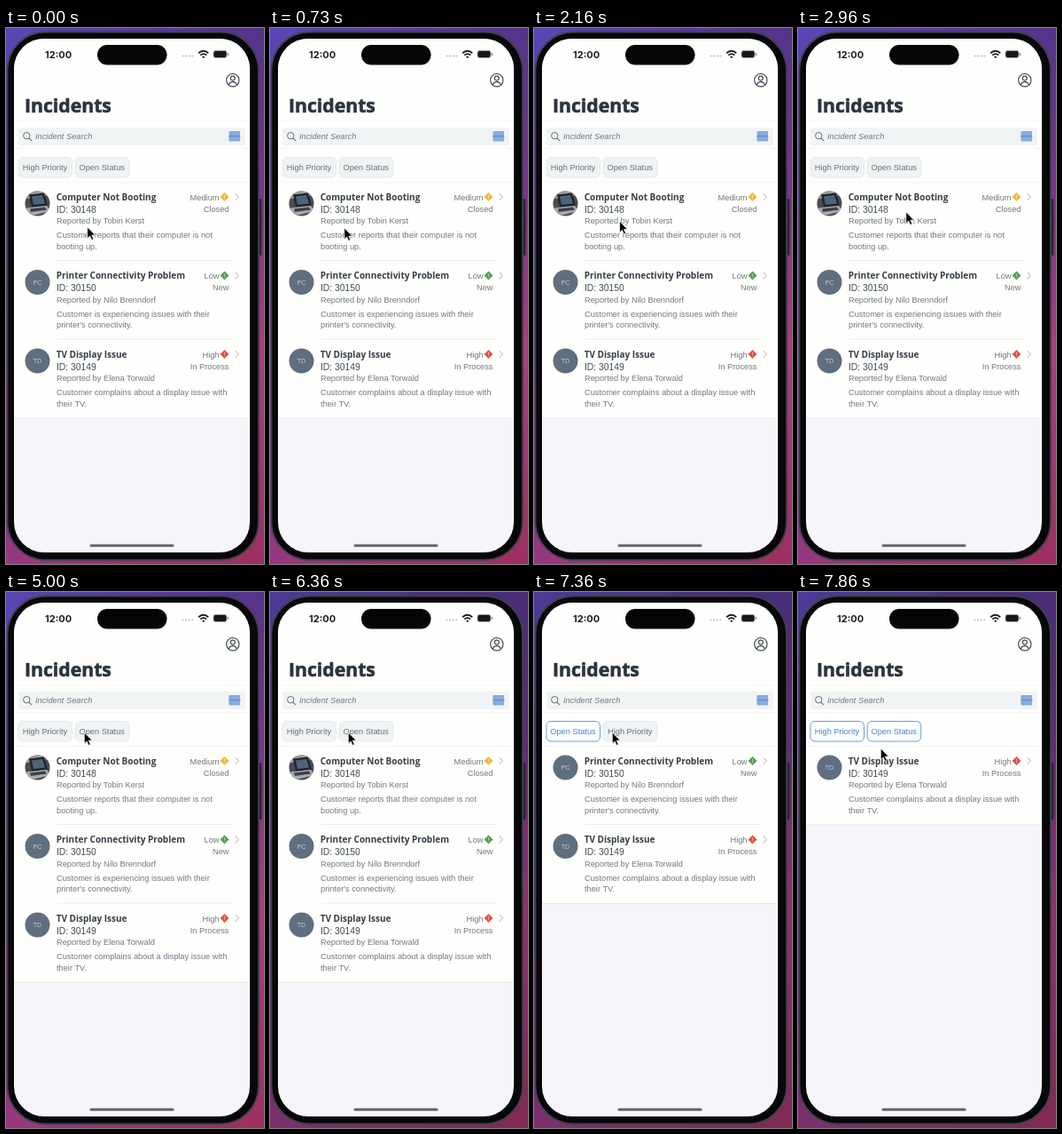
Write an HTML page that moves like this. It is 291 by 603 pixels and loops after 8000 ms.

```html
<!DOCTYPE html>
<html lang="en">
<head>
<meta charset="utf-8">
<title>Incidents</title>
<style>
html, body { margin: 0; width: 100%; height: 100%; overflow: hidden; background: #0a0a0d; }
svg { display: block; width: 100vw; height: 100vh; }
text { font: 9.25px "Liberation Sans", Arial, sans-serif; fill: #6f7881; }
.title { font: 700 21.2px "Open Sans", "Noto Sans", sans-serif; fill: #2c353e; stroke: #2c353e; stroke-width: .6; }
.name { font: 700 10px "Open Sans", "Noto Sans", sans-serif; fill: #353e47; }
.id { font-size: 10.3px; fill: #434c55; }
.clock { font: 700 11px Inter, sans-serif; fill: #1d1f21; }
.search { font-style: italic; }
.end { text-anchor: end; }
.initials { font-size: 7.2px; fill: #c3cbd3; text-anchor: middle; }
.chip rect { fill: #f0f3f4; stroke: #e6eaeb; }
.chip text { fill: #66717b; text-anchor: middle; }
.chip.on rect { fill: #fdfeff; stroke: #6f9bd3; }
.chip.on text { fill: #4c83c8; }
</style>
</head>
<body>
<svg viewBox="0 0 291 603" preserveAspectRatio="none">
  <defs>
    <linearGradient id="left" x2="0" y2="1">
      <stop stop-color="#5a46b4"/><stop offset=".5" stop-color="#55408f"/>
      <stop offset=".85" stop-color="#7d3582"/><stop offset="1" stop-color="#983a80"/>
    </linearGradient>
    <linearGradient id="right" x2="0" y2="1">
      <stop stop-color="#54338a"/><stop offset=".3" stop-color="#78368c"/>
      <stop offset=".6" stop-color="#b03c7e"/><stop offset="1" stop-color="#9c305f"/>
    </linearGradient>
    <linearGradient id="fade">
      <stop stop-color="#000"/><stop offset="1" stop-color="#fff"/>
    </linearGradient>
    <mask id="blend"><rect width="291" height="603" fill="url(#fade)"/></mask>
    <clipPath id="screen"><rect x="9" y="12" width="266" height="578" rx="34"/></clipPath>
    <clipPath id="round"><circle cx="35.5" cy="24" r="14"/></clipPath>
  </defs>

  <rect width="291" height="603" fill="url(#left)"/>
  <rect width="291" height="603" fill="url(#right)" mask="url(#blend)"/>
  <rect id="dim" width="291" height="603" fill="#1c1430" opacity="0"/>
  <rect x="284" y="192" width="4.5" height="64" rx="1.5" fill="#2b2535"/>
  <rect x="1.5" y="4.5" width="283.5" height="594" rx="43" fill="#08080b" stroke="#45414f" stroke-width="1.8"/>

  <g clip-path="url(#screen)">
    <rect x="9" y="12" width="267" height="579" fill="#f5f5fa"/>
    <rect id="panel" x="9" y="12" width="267" fill="#fefefc"/>
    <path id="edge" stroke="#e8e9ec"/>
    <path d="M9 104.5H276M9 135.5H276M9 173.5H276" stroke="#f5f6f6"/>
    <g id="rows"></g>
  </g>

  <text class="clock" x="44" y="34">12:00</text>
  <rect x="103" y="19" width="78.5" height="22.5" rx="11.2" fill="#050506"/>
  <g fill="#b9bcc0">
    <circle cx="199.5" cy="31.5" r="1"/><circle cx="203" cy="31.5" r="1"/>
    <circle cx="206.6" cy="31.5" r="1"/><circle cx="210.2" cy="31.5" r="1"/>
  </g>
  <g fill="none" stroke="#17181a" stroke-width="1.8">
    <path d="M217.2 28.2Q222.700 23.4 228.2 28.2M219.2 30.6Q222.700 27.6 226.2 30.6"/>
    <path d="M222.7 34.2l-1.6-1.9q1.6-1.2 3.2 0z" fill="#17181a" stroke="none"/>
  </g>
  <rect x="234" y="25.5" width="15" height="8" rx="2.4" fill="#17181a" stroke="#a9abad" stroke-width=".8"/>
  <path d="M250.5 28v3" stroke="#88898c" stroke-width="1.2"/>

  <g fill="none" stroke="#3a434c" stroke-width="1.1">
    <circle cx="255.8" cy="58.7" r="7.2"/>
    <circle cx="255.8" cy="56.6" r="2.5"/>
    <path d="M251.3 64Q252 60.6 255.8 60.6T260.3 64"/>
  </g>
  <text class="title" x="21" y="95">Incidents</text>

  <rect x="14" y="112" width="256" height="20" rx="3" fill="#f0f4f4"/>
  <path d="M26.2 124.2l3 3" stroke="#626c77" stroke-width="1.1"/>
  <circle cx="23.3" cy="121.2" r="3.7" fill="none" stroke="#626c77"/>
  <text class="search" x="33" y="125.2">Incident Search</text>
  <rect x="251.5" y="116" width="12.5" height="11.5" rx="1" fill="#85abe0"/>
  <path d="M251 121.8h13.5" stroke="#5b89d0"/>

  <g id="chips"></g>
  <rect x="94.5" y="580.7" width="95" height="3" rx="1.5" fill="#66676b"/>
  <path id="cursor" d="M0 0V12.6L2.9 10L4.9 14.4L7 13.5L5 9.1H9Z" fill="#060606" stroke="#fff" stroke-width=".7"/>
</svg>

<script>
const $ = id => document.getElementById(id);
const LOOP = 8000, OPEN_AT = 6500, HIGH_AT = 7530, PITCH = 88.5;

const photo = `<g clip-path="url(#round)">
  <rect x="21" y="9" width="29" height="30" fill="#4d4a50"/>
  <path d="M21 9h29v5l-29 5z" fill="#a59c99"/>
  <path d="M26 14l17-2 4 14-18 2z" fill="#1f2630"/>
  <path d="M29 16l12-1.500 3 9.500-13 1.500z" fill="#4d6479"/>
  <path d="M23 29l23-2.500 4 6-25 6z" fill="#a9abb2"/>
  <path d="M27 30l17-2 2 3-18 2.500z" fill="#3c3f47"/></g>`;

const items = [
  ["", "Computer Not Booting", 30148, "Tobin Kerst", "Medium", "#f0b83c", "Closed",
    "Customer reports that their computer is not", "booting up."],
  ["PC", "Printer Connectivity Problem", 30150, "Nilo Brenndorf", "Low", "#5a9f57", "New",
    "Customer is experiencing issues with their", "printer's connectivity."],
  ["TD", "TV Display Issue", 30149, "Elena Torwald", "High", "#dd5546", "In Process",
    "Customer complains about a display issue with", "their TV."],
];

function row([initials, name, id, by, priority, color, status, line1, line2], i, list) {
  const avatar = initials
    ? `<circle cx="35.5" cy="24" r="14" fill="#5f6f7f"/><text class="initials" x="35.5" y="26.6">${initials}</text>`
    : photo;
  const rule = i < list.length - 1 ? `<path d="M57 88H256" stroke="#eceeef"/>` : "";
  return `<g transform="translate(0 ${173.5 + i * PITCH})">${avatar}${rule}
    <text class="name" x="56.7" y="20">${name}</text>
    <text class="id" x="57" y="34">ID: ${id}</text>
    <text x="57" y="46.7">Reported by ${by}</text>
    <text x="57" y="62.7">${line1}</text>
    <text x="57" y="75.2">${line2}</text>
    <text class="end" x="240.5" y="20">${priority}</text>
    <text class="end" x="251.5" y="33">${status}</text>
    <path d="M246.5 11.5l5 5-5 5-5-5z" fill="${color}"/>
    <path d="M246.5 14.2v2.8M246.5 18v1" stroke="#fff" stroke-width=".9" opacity=".6"/>
    <path d="M258.5 12.5l4 4-4 4" fill="none" stroke="#aeb3b8"/></g>`;
}

function chip([label, on], i) {
  const x = i ? 78.2 : 14;
  return `<g class="chip ${on ? "on" : ""}">
    <rect x="${x}" y="145.5" width="60.5" height="22.5" rx="5"/>
    <text x="${x + 30}" y="160">${label}</text></g>`;
}

// Number of filters applied: 0 none, 1 open, 2 open and high priority
let shown = -1;
function showFilters(n) {
  if (n === shown) return;
  shown = n;
  const list = items.slice(n);
  const chips = [["High Priority", n > 1], ["Open Status", n > 0]];
  if (n === 1) chips.reverse();
  const end = 173.5 + list.length * PITCH;
  $("rows").innerHTML = list.map(row).join("");
  $("chips").innerHTML = chips.map(chip).join("");
  $("panel").setAttribute("height", end - 12);
  $("edge").setAttribute("d", `M9 ${end}H276`);
}

// Pointer stops: time, x, y
const stops = [
  [0, 91.8, 224], [1460, 75.8, 226], [2960, 121.8, 207],
  [3630, 88.3, 158], [7560, 88.3, 158], [7830, 93.3, 176], [LOOP, 93.3, 176],
];
const ease = u => u * u * (3 - 2 * u);
const clamp = u => Math.min(1, Math.max(0, u));

function pointer(t) {
  const i = stops.findIndex(s => s[0] > t);
  const [t0, x0, y0] = stops[i - 1], [t1, x1, y1] = stops[i];
  const u = ease((t - t0) / (t1 - t0));
  return [x0 + (x1 - x0) * u, y0 + (y1 - y0) * u];
}

function draw(now) {
  const t = now % LOOP;
  showFilters((t >= OPEN_AT) + (t >= HIGH_AT));
  $("dim").setAttribute("opacity", .22 * clamp((t - 5000) / 1300));
  $("cursor").setAttribute("transform", `translate(${pointer(t)})`);
  requestAnimationFrame(draw);
}
draw(0);
</script>
</body>
</html>
```
